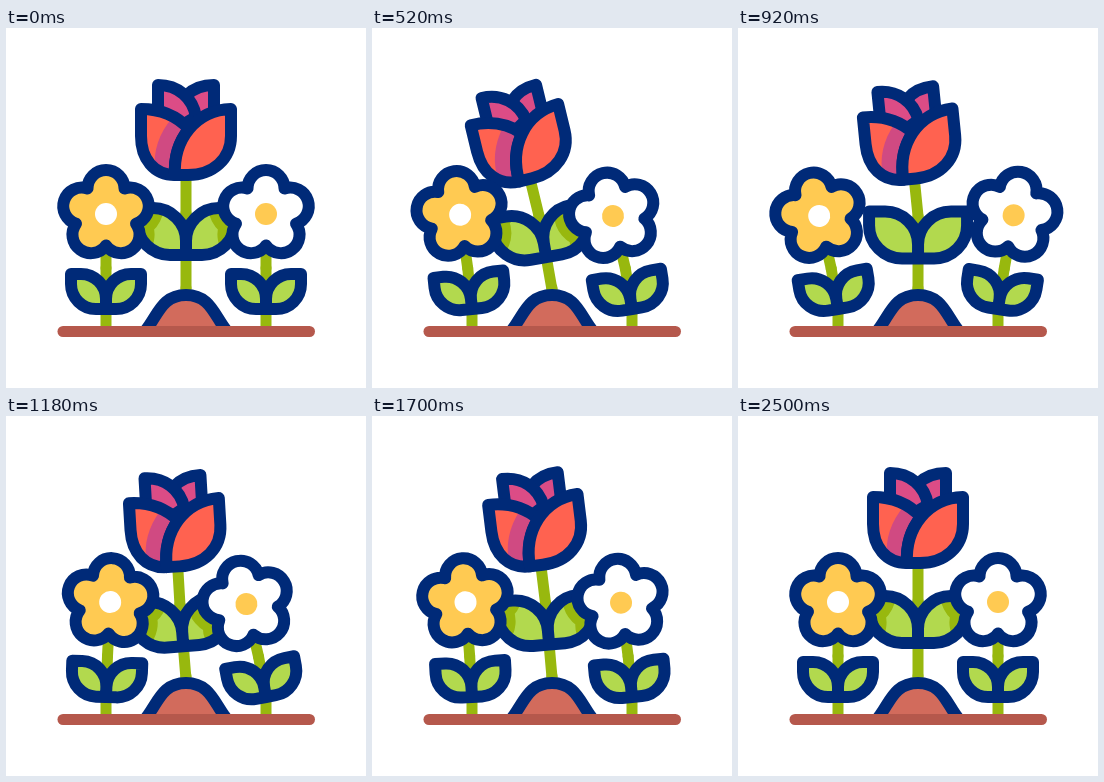
An HTML page without scripts that plays this animation: 360 by 360 pixels, repeating every 2800 ms.

```html
<!DOCTYPE html>
<html lang="en">
<head>
<meta charset="utf-8">
<title>Swaying flowers</title>
<style>
  html, body { margin: 0; height: 100%; overflow: hidden; background: #fff; }
  svg { display: block; width: 100%; height: 100%; }

  .ink { stroke: #002a78; stroke-width: 12; stroke-linejoin: round; stroke-linecap: round; }
  .stem { stroke: #98b80e; stroke-width: 11; stroke-linecap: round; fill: none; }
  .leaf { fill: #b2d94e; }
  .line { fill: none; }
  .shade { fill: #98b80e; stroke: #98b80e; stroke-width: 30; stroke-linejoin: round; }

  /* One damped sway; each plant starts a little later, its tip ahead of its stalk */
  .yellow { --delay: 0ms; --tip-delay: 0ms; }
  .tulip { --delay: 85ms; --tip-delay: 0ms; }
  .white { --delay: 160ms; --tip-delay: 110ms; }
  .sway {
    transform-box: view-box;
    animation: sway 2800ms cubic-bezier(.37, 0, .63, 1) var(--delay) infinite;
  }
  .stalk {
    --a: 10deg;
    transform-origin: 180px 260px;
    animation-name: sway, sink;
    animation-delay: var(--delay), 0ms;
  }
  .bud { --a: 7deg; transform-origin: 180px 185px; }
  .low { --a: 11.5deg; transform-origin: 100px 281px; }
  .high { --a: 4deg; transform-origin: 100px 240px; }
  .bud, .high { animation-delay: var(--tip-delay); }

  @keyframes sway {
    0%, 6.43% { rotate: 0deg; }
    15.5% { rotate: calc(var(--a) * -1); }
    25% { rotate: var(--a); }
    34.75% { rotate: calc(var(--a) * -1); }
    45.57% { rotate: calc(var(--a) * .52); }
    56.54% { rotate: calc(var(--a) * -.52); }
    68.57% { rotate: calc(var(--a) * .35); animation-timing-function: cubic-bezier(.3, .2, .6, 1); }
    83.57%, 100% { rotate: 0deg; }
  }
  @keyframes sink {
    0%, 6.43%, 83.57%, 100% { translate: 0 0; }
    32% { translate: 0 3.5px; }
  }
</style>
</head>
<body>
<svg viewBox="0 0 360 360">
  <defs>
    <path id="bloom" transform="translate(100 186)" d="M-18.5-25.5A18.5 18.5 0 0 1 18.5-25.5A18.5 18.5 0 0 1 30 9.7A18.5 18.5 0 0 1 0 31.5A18.5 18.5 0 0 1-30 9.7A18.5 18.5 0 0 1-18.5-25.5Z"/>
    <path id="smallLeaves" d="M65 246H75A25 25 0 0 1 100 271V281H90A25 25 0 0 1 65 256ZM135 246H125A25 25 0 0 0 100 271V281H110A25 25 0 0 0 135 256Z"/>
    <path id="bigLeaves" d="M131 180H147A33 33 0 0 1 180 213V227H164A33 33 0 0 1 131 194ZM229 180H213A33 33 0 0 0 180 213V227H196A33 33 0 0 0 229 194Z"/>
    <path id="leftPetal" d="M135 81C155 81 171 88 183 101C173 114 168 130 169 147C148 147 135 131 135 108Z"/>
    <clipPath id="leafArea" class="tulip">
      <use href="#bigLeaves" class="sway stalk"/>
    </clipPath>
  </defs>

  <g class="tulip">
    <path class="stem" d="M180 300V260"/>
    <g class="sway stalk">
      <path class="stem" d="M180 260V185"/>
      <g class="sway bud">
        <path class="stem" d="M180 185V145"/>
        <g class="ink" fill="#dc4c86">
          <path d="M181 67C188 60 198 57 208 57V96H188Z"/>
          <path d="M152 86V57C172 57 187 70 190 89L165 104Z"/>
        </g>
        <use href="#leftPetal" fill="#ff6250"/>
        <path fill="#d04a82" d="M166 90C153 106 147 122 149 143L169 147L183 101Z"/>
        <use href="#leftPetal" class="ink line"/>
        <path class="ink" fill="#ff6250" d="M169 147C167 111 190 82 225 81V108C225 131 207 147 182 147Z"/>
      </g>
      <use href="#bigLeaves" class="leaf"/>
    </g>
  </g>

  <!-- Shade the blooms cast on the big leaves -->
  <g clip-path="url(#leafArea)">
    <g class="yellow">
      <g class="sway low"><g class="sway high"><use href="#bloom" class="shade"/></g></g>
    </g>
    <g class="white" transform="translate(160)">
      <g class="sway low"><g class="sway high"><use href="#bloom" class="shade"/></g></g>
    </g>
  </g>
  <g class="tulip"><use href="#bigLeaves" class="ink line sway stalk"/></g>

  <path class="ink" fill="#d26b5c" d="M140 302C152 287 156 267 180 267S208 287 220 302"/>

  <g class="yellow">
    <path class="stem" d="M100 300V281"/>
    <g class="sway low">
      <path class="stem" d="M100 281V240"/>
      <g class="sway high">
        <path class="stem" d="M100 240V210"/>
        <use href="#bloom" class="ink" fill="#ffca52"/>
        <circle cx="100" cy="186" r="11" fill="#fff"/>
      </g>
      <use href="#smallLeaves" class="ink leaf"/>
    </g>
  </g>

  <g class="white" transform="translate(160)">
    <path class="stem" d="M100 300V281"/>
    <g class="sway low">
      <path class="stem" d="M100 281V240"/>
      <g class="sway high">
        <path class="stem" d="M100 240V210"/>
        <use href="#bloom" class="ink" fill="#fff"/>
        <circle cx="100" cy="186" r="11" fill="#ffca52"/>
      </g>
      <use href="#smallLeaves" class="ink leaf"/>
    </g>
  </g>

  <path d="M57 303.5H303.5" stroke="#b5584c" stroke-width="11" stroke-linecap="round"/>
</svg>
</body>
</html>
```
